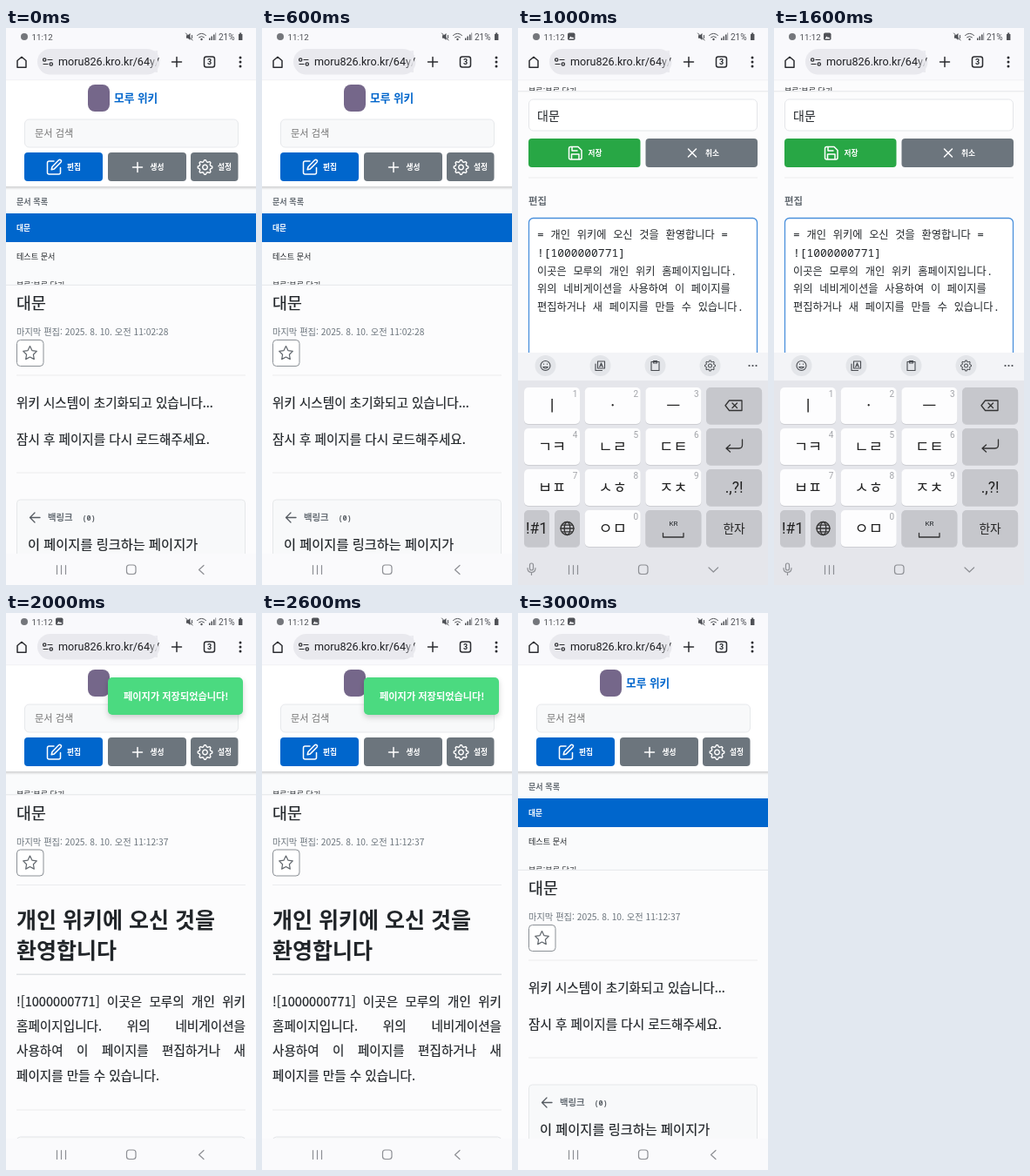
Animation of 287 by 640 pixels, one loop 4000 ms. Source, as an HTML page:

```html
<!DOCTYPE html>
<html lang="ko">
<head>
<meta charset="utf-8">
<title>모루 위키</title>
<style>
html, body { margin: 0; width: 100%; height: 100%; overflow: hidden; background: #fcfcfd; }
svg { display: block; width: 100vw; height: 100vh; }
svg, p { font-family: "Noto Sans CJK KR", "Noto Sans CJK", sans-serif; }
text { fill: #212529; white-space: pre; }
p { margin: 0; font-size: 14.6px; line-height: 28.4px; color: #212529; text-align: justify; word-break: keep-all; -webkit-text-stroke: .2px; }
.ui { font-family: Roboto, "Noto Sans CJK KR", sans-serif; }
.mono { font-family: "Noto Sans Mono", "Noto Sans CJK KR", monospace; font-size: 12.95px; }
.mono .ko { font-family: "Noto Sans CJK KR", sans-serif; font-size: 12.2px; }
.btn { font-size: 8.7px; font-weight: 700; fill: #fff; }
.row { font-size: 9.1px; font-weight: 500; }
.head { font-size: 18.4px; }
.body { font-size: 14.6px; }
.head, .body { stroke: #212529; stroke-width: .2px; }
.date { font-size: 10.25px; fill: #6c757d; }
.label { font-weight: 700; fill: #666d74; }
.line { fill: none; stroke-linecap: round; stroke-linejoin: round; }
.rule { fill: #ebecee; }
.mid { text-anchor: middle; }
.key { font-size: 17.5px; fill: #222; }
.num { font-size: 10px; fill: #a2a4a9; }
</style>
</head>
<body>
<svg viewBox="0 0 287 640" preserveAspectRatio="none">
<defs>
  <linearGradient id="shade" x2="0" y2="1">
    <stop stop-color="#000" stop-opacity=".17"/><stop offset="1" stop-color="#000" stop-opacity="0"/>
  </linearGradient>
  <linearGradient id="fade">
    <stop stop-color="#e9e9ee" stop-opacity="0"/><stop offset="1" stop-color="#e9e9ee"/>
  </linearGradient>
  <filter id="drop" x="-10%" y="-20%" width="120%" height="160%">
    <feDropShadow dx="0" dy="3" stdDeviation="3" flood-opacity=".18"/>
  </filter>
  <clipPath id="cut"><rect width="100" height="4.8"/></clipPath>
  <clipPath id="page"><rect y="60" width="287" height="544"/></clipPath>
  <clipPath id="form"><rect y="60" width="287" height="313"/></clipPath>

  <g id="gear" class="line" stroke-width="1.4">
    <path id="cog"/>
    <circle r="2.8"/>
  </g>

  <!-- top of a list row that is scrolled out of view -->
  <g id="cutrow">
    <g clip-path="url(#cut)"><text class="row" x="12" y="8.6">분류:분류 닫기</text></g>
    <rect y="4.8" width="287" height="1" fill="#e4e6e9"/>
  </g>

  <g id="article">
    <text class="head" x="12" y="28">대문</text>
    <rect x="12.5" y="63.5" width="30.5" height="30" rx="4" fill="#fff" stroke="#8b9096"/>
    <path class="line" d="M27.5 70.6l2.4 5 5.4.8-3.9 3.8.9 5.4-4.8-2.6-4.8 2.6.9-5.4-3.9-3.8 5.4-.8z" stroke="#62686e" stroke-width="1.2"/>
    <rect class="rule" x="12" y="103.5" width="263" height="1"/>
  </g>

  <g id="tools">
    <rect x="21.5" y="105" width="245" height="32" rx="5" fill="#f8f9fa" stroke="#e7e9ec"/>
    <text x="33" y="125" font-size="11.2" style="fill:#757575">문서 검색</text>
    <rect x="21" y="143" width="90" height="33" rx="4" fill="#0066cc"/>
    <rect x="117" y="143" width="90" height="33" rx="4" fill="#6c757d"/>
    <rect x="212" y="143" width="54.5" height="33" rx="4" fill="#6c757d"/>
    <g class="line" stroke="#fff" stroke-width="1.5">
      <path d="M55 153h-5.5q-2 0-2 2v11q0 2 2 2h11q2 0 2-2v-5.5M60.5 151.800q1.300-1 2.500 0t0 2.500l-7.600 7.600-3.200.8.8-3.200z"/>
      <path d="M145.500 160h11M151 154.500v11"/>
    </g>
    <use href="#gear" x="228.500" y="160" stroke="#fff"/>
    <text class="btn" x="70" y="163.300">편집</text>
    <text class="btn" x="165.500" y="163.300">생성</text>
    <text class="btn" x="243" y="163.300">설정</text>
  </g>

  <g id="header">
    <rect y="60" width="287" height="122" fill="#fff"/>
    <rect y="182" width="287" height="4" fill="url(#shade)"/>
    <rect x="94" y="65" width="25" height="31" rx="8" fill="#75678a"/>
    <text x="124" y="84.7" font-size="12.7" font-weight="700" style="fill:#0066cc">모루 위키</text>
    <use href="#tools"/>
  </g>
</defs>

<rect width="287" height="640" fill="#fcfcfd"/>

<!-- document list and article -->
<g data-on="0 3" clip-path="url(#page)">
  <rect y="182" width="287" height="113" fill="#fafbfc"/>
  <use href="#header"/>
  <text class="row label" x="12" y="202.5">문서 목록</text>
  <rect y="213" width="287" height="33" fill="#0066cc"/>
  <text class="btn" x="12" y="232.8">대문</text>
  <text class="row" x="12" y="265.6">테스트 문서</text>
  <use href="#cutrow" y="290"/>
  <use href="#article" y="295"/>
  <text class="date" x="12" y="353.3" data-on="0">마지막 편집: 2025. 8. 10. 오전 11:02:28</text>
  <text class="date" x="12" y="353.3" data-on="3">마지막 편집: 2025. 8. 10. 오전 11:12:37</text>
  <text class="body" x="12" y="435.5">위키 시스템이 초기화되고 있습니다...</text>
  <text class="body" x="12" y="478">잠시 후 페이지를 다시 로드해주세요.</text>
  <rect class="rule" x="12" y="510.5" width="263" height="1"/>
  <rect x="12.5" y="542" width="262" height="90" rx="4" fill="#f8f9fa" stroke="#e6e8ea"/>
  <path class="line" d="M39 562.5H28M33 557l-5.5 5.5 5.5 5.5" stroke="#555b61" stroke-width="1.3"/>
  <text class="label" x="48" y="566.3" font-size="10.4">백링크</text>
  <text class="mono" x="87.5" y="565.7" style="fill:#555b61;font-size:8.5px;font-weight:600">(0)</text>
  <text class="body" x="25" y="598.7" style="font-size:15.25px">이 페이지를 링크하는 페이지가</text>
</g>

<!-- edit form with keyboard -->
<g data-on="1">
  <g clip-path="url(#form)">
    <use href="#cutrow" y="67.5"/>
    <rect x="12.5" y="82" width="262" height="36" rx="5" fill="#fff" stroke="#e4e6e9"/>
    <text x="22" y="105.5" font-size="14">대문</text>
    <rect x="12" y="127" width="128.5" height="33" rx="4" fill="#28a745"/>
    <rect x="146.5" y="127" width="128.5" height="33" rx="4" fill="#6c757d"/>
    <g class="line" stroke="#fff" stroke-width="1.5">
      <path d="M60.5 136.5h8.5l4 4v8.5q0 2-2 2H60.5q-2 0-2-2v-10.5q0-2 2-2zM62 136.5v4.500h6M61.5 151v-6h8.5v6"/>
      <path d="M195.5 139l9 9M204.5 139l-9 9"/>
    </g>
    <text class="btn" x="80.5" y="146.8">저장</text>
    <text class="btn" x="215" y="146.8">취소</text>
    <rect class="rule" x="12" y="171.5" width="263" height="1"/>
    <text class="label" x="12" y="203.3" font-size="11.4">편집</text>
    <rect x="12.5" y="218.5" width="262" height="200" rx="5" fill="#fff" stroke="#4a90dc" stroke-width="1.3"/>
    <g id="note"></g>
  </g>
  <rect y="373" width="287" height="32" fill="#f3f4f7"/>
  <rect y="405" width="287" height="235" fill="#e5e6eb"/>
  <g fill="#e3e5e9">
    <circle cx="31.5" cy="388" r="12"/><circle cx="94.5" cy="388" r="12"/>
    <circle cx="157.5" cy="388" r="12"/><circle cx="220.5" cy="388" r="12"/>
  </g>
  <g class="line" stroke="#484b50" stroke-width="1.1">
    <circle cx="31.5" cy="388" r="5.5"/>
    <path d="M28.7 389.5q2.8 3.6 5.6 0zM29.5 386v.3M33.5 386v.3"/>
    <path d="M91.5 383h8v8h-8zM89 386v7.5h7.5M93.700 389.5l1.800-4.500 1.800 4.500M94.3 388h2.400"/>
    <path d="M153 383.5h9v10h-9zM155.5 382.5h4v2.500h-4z"/>
  </g>
  <use href="#gear" transform="translate(220.5 388) scale(.72)" stroke="#484b50"/>
  <g fill="#484b50"><circle cx="265.5" cy="388" r="1.1"/><circle cx="269.5" cy="388" r="1.1"/><circle cx="273.5" cy="388" r="1.1"/></g>
  <g id="keys"></g>
  <g class="line" stroke="#333" stroke-width="1.3">
    <path d="M242.5 428h14.5v11.5h-14.5l-4.5-5.75zM246 431l5.5 5.5M251.5 431l-5.5 5.5"/>
    <path d="M257.5 473v6q0 4-4 4h-14M243.5 479l-4.5 4 4.5 4"/>
    <circle cx="56.5" cy="575" r="7.5"/>
    <ellipse cx="56.5" cy="575" rx="3.3" ry="7.5"/>
    <path d="M49 575h15M50.5 571.2h12M50.5 578.8h12"/>
    <path d="M166.5 580.5v4.5h23.500v-4.5"/>
  </g>
  <text class="ui mid" x="178.5" y="572" font-size="8">KR</text>
</g>

<!-- saved article with toast -->
<g data-on="2" clip-path="url(#page)">
  <rect y="182" width="287" height="27" fill="#fafbfc"/>
  <use href="#header"/>
  <use href="#cutrow" y="203.5"/>
  <use href="#article" y="208.5"/>
  <text class="date" x="12" y="266.8">마지막 편집: 2025. 8. 10. 오전 11:12:37</text>
  <g font-size="25" font-weight="700">
    <text x="12" y="362.3">개인 위키에 오신 것을</text>
    <text x="12" y="397.3">환영합니다</text>
  </g>
  <rect x="12" y="414.5" width="263" height="1.5" fill="#dfe2e5"/>
  <foreignObject x="12" y="431.5" width="263" height="120">
    <p>![1000000771] 이곳은 모루의 개인 위키 홈페이지입니다. 위의 네비게이션을 사용하여 이 페이지를 편집하거나 새 페이지를 만들 수 있습니다.</p>
  </foreignObject>
  <rect class="rule" x="12" y="570.5" width="263" height="1"/>
  <rect x="12.5" y="602" width="262" height="40" rx="4" fill="#f8f9fa" stroke="#e3e5e8"/>
  <rect x="117" y="74" width="155" height="43" rx="5" fill="#4bda80" filter="url(#drop)"/>
  <text x="135" y="100" font-size="11.2" font-weight="700" style="fill:#fff">페이지가 저장되었습니다!</text>
</g>

<!-- status bar and browser bar -->
<rect width="287" height="60" fill="#f9f9fc"/>
<rect y="59.5" width="287" height=".7" fill="#eeeef1"/>
<g class="ui" font-size="10">
  <circle cx="21" cy="10" r="4" fill="#74767b"/>
  <text x="29.5" y="13.5" font-size="9.7" style="fill:#505257">11:12</text>
  <text x="244" y="13.5" style="fill:#505257">21%</text>
</g>
<g data-on="1 2 3">
  <rect x="57" y="5.5" width="8.5" height="8.5" rx="1.8" fill="#505257"/>
  <path d="M58.5 12.5l2-3 1.5 1.700 1-1 1.300 2.300z" fill="#f9f9fc"/>
</g>
<g fill="#505257">
  <path d="M207 8.300h1.800l2.700-2.300v8l-2.700-2.300h-1.800z"/>
  <path d="M233 14v-2.5h1.5V14zM235.5 14v-4.5h1.5V14zM238 14V7.5h1.5V14z"/>
  <path d="M240 14V5.5h1.2V14z" opacity=".5"/>
  <path d="M267 7h1.2V5.5h2V7h1.2v7h-4.4z"/>
  <circle cx="224.5" cy="13" r="1.2"/>
</g>
<g class="line" stroke="#505257" stroke-width="1">
  <path d="M206.5 6l7.5 8M213.500 8.5v3"/>
  <path d="M219.5 8.5q5-4.5 10 0M221.5 10.8q3-2.6 6 0"/>
</g>
<rect x="36" y="24" width="140.5" height="29.5" rx="14.75" fill="#e9e9ee"/>
<text class="ui" x="60" y="43.3" font-size="12.6" style="fill:#1f2024">moru826.kro.kr/64y/</text>
<rect x="164" y="26" width="10" height="25" fill="url(#fade)"/>
<g class="line" stroke="#2b2c30" stroke-width="1.5">
  <path d="M13 37.500l5-4.300 5 4.300v7.800h-10z"/>
  <path d="M190.5 39h11M196 33.5v11"/>
  <rect x="227.5" y="33" width="12" height="12" rx="2.5"/>
  <g stroke-width="1.2">
    <circle cx="44.2" cy="36.5" r="1.7"/><path d="M48 36.5h5"/>
    <circle cx="51.8" cy="41.5" r="1.7"/><path d="M43 41.5h5"/>
  </g>
</g>
<text class="ui mid" x="233.5" y="42.3" font-size="9" font-weight="700">3</text>
<g fill="#2b2c30"><circle cx="269" cy="34" r="1.5"/><circle cx="269" cy="39" r="1.5"/><circle cx="269" cy="44" r="1.5"/></g>

<!-- system navigation -->
<rect y="604" width="287" height="36" fill="#fafafc" data-on="0 2 3"/>
<g class="line" stroke="#8d8f94" stroke-width="1.2">
  <path d="M58.5 617.5v10M63.5 617.5v10M68.5 617.5v10"/>
  <rect x="138.5" y="617" width="10.5" height="10.5" rx="3"/>
  <path d="M227 617.5l-5.5 5 5.5 5" data-on="0 2 3"/>
  <g data-on="1">
    <path d="M219 620l5.3 5 5.3-5"/>
    <rect x="13.5" y="615" width="4" height="8" rx="2"/>
    <path d="M11 620.5q0 5 4.5 5t4.5-5M15.5 625.5v3"/>
  </g>
</g>
</svg>

<script>
const $ = id => document.getElementById(id);
const LOOP = 4000, STEPS = 4, TEETH = 8;

const cog = Array.from({ length: TEETH * 4 }, (_, i) => {
  const r = i % 4 < 2 ? 8.3 : 6.5, a = (i - .5) / (TEETH * 4) * 2 * Math.PI;
  return `${(r * Math.sin(a)).toFixed(2)} ${(-r * Math.cos(a)).toFixed(2)}`;
});
$("cog").setAttribute("d", `M${cog.join("L")}z`);

const note = [
  "= 개인 위키에 오신 것을 환영합니다 =",
  "![1000000771]",
  "이곳은 모루의 개인 위키 홈페이지입니다.",
  "위의 네비게이션을 사용하여 이 페이지를",
  "편집하거나 새 페이지를 만들 수 있습니다."
];
$("note").innerHTML = note.map((line, i) => {
  const runs = line.replace(/[가-힣]+/g, '<tspan class="ko">$&</tspan>');
  return `<text class="mono" x="22" y="${242.3 + i * 20.7}">${runs}</text>`;
}).join("");

// label, digit in the corner, grey key
const rows = [
  [["ㅣ", 1], ["·", 2], ["ㅡ", 3], ["", "", 1]],
  [["ㄱㅋ", 4], ["ㄴㄹ", 5], ["ㄷㅌ", 6], ["", "", 1]],
  [["ㅂㅍ", 7], ["ㅅㅎ", 8], ["ㅈㅊ", 9], [".,?!", "", 1]],
  [["", ""], ["ㅇㅁ", 0], ["", "", 1], ["한자", "", 1]]
];

function key(x, y, w, label, digit, grey) {
  const size = label === "한자" ? 13.7 : 17.5;
  const face = /[ㄱ-힣·]/.test(label) ? "" : "ui";
  return `<rect x="${x}" y="${y + 1}" width="${w}" height="42" rx="5" fill="#cdced3"/>
    <rect x="${x}" y="${y}" width="${w}" height="42" rx="5" fill="${grey ? "#c6c7cc" : "#fdfdfe"}"/>
    <text class="key mid ${face}" x="${x + w / 2}" y="${y + 21 + size * .37}" style="font-size:${size}px">${label}</text>
    <text class="num mid ui" x="${x + 58.5}" y="${y + 11}">${digit}</text>`;
}

$("keys").innerHTML = rows.map((row, r) => row.map(([label, digit, grey], c) => {
  const x = 7 + c * 69.7, y = 413 + r * 47;
  if (r === 3 && c === 0) return key(7, y, 29, "!#1", "", 1) + key(42, y, 29, "", "", 1);
  return key(x, y, 64, label, digit, grey);
}).join("")).join("");

// Each part is shown only during its listed steps of the loop.
for (const part of document.querySelectorAll("[data-on]")) {
  const on = part.dataset.on.split(" ").map(Number);
  const frames = Array.from({ length: STEPS + 1 }, (_, i) => ({
    opacity: on.includes(i % STEPS) ? 1 : 0,
    offset: i / STEPS,
    easing: "steps(1, end)"
  }));
  part.animate(frames, { duration: LOOP, iterations: Infinity });
}
</script>
</body>
</html>
```
